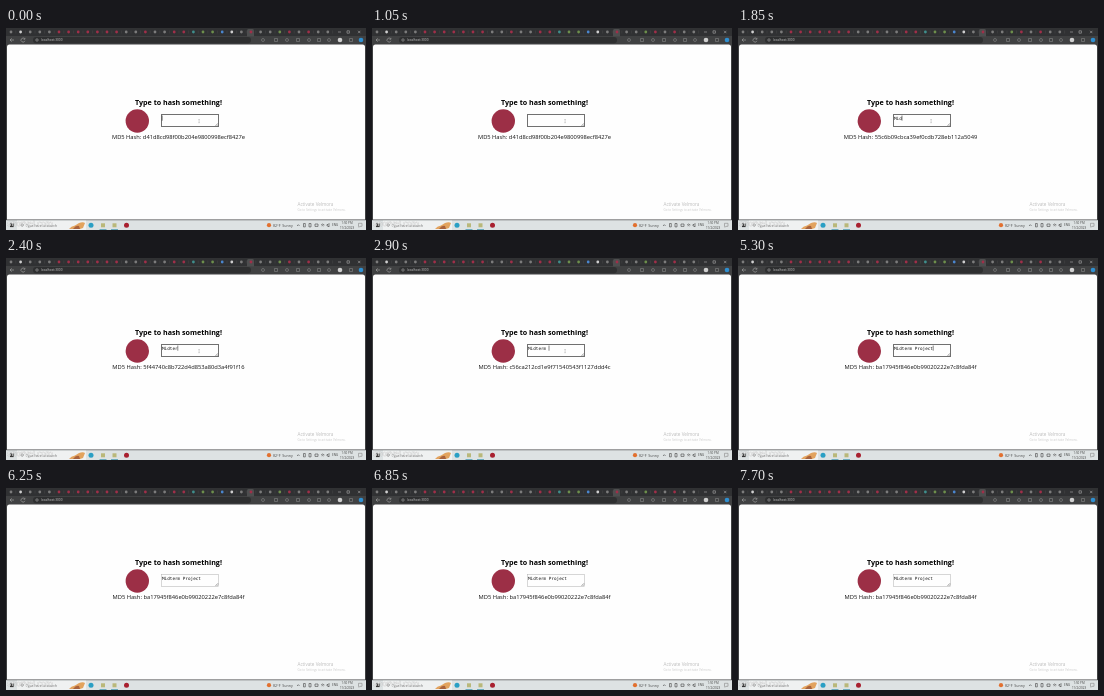
Animation of 360x202 px, one loop 7750 ms. Source, as an HTML page:

```html
<!DOCTYPE html>
<html lang="en">
<head>
<meta charset="utf-8">
<title>Type to hash something</title>
<style>
  html, body { margin: 0; width: 100%; height: 100%; overflow: hidden; background: #fff; }
  svg { display: block; width: 360px; height: 202px; }
  text { font-family: "Open Sans", "Noto Sans", sans-serif; white-space: pre; }
  .mono { font-family: "DejaVu Sans Mono", monospace; }
</style>
</head>
<body>
<svg viewBox="0 0 360 202">
  <rect width="360" height="202" fill="#404142"/>
  <rect width="360" height="8" fill="#303133"/>
  <path d="M241 8.500V2.500q0-1.500 1.500-1.500h4q1.500 0 1.500 1.500v6z" fill="#4d4e4f"/>
  <g id="tabs"></g>
  <g id="tools" fill="none" stroke="#858687" stroke-width=".6"></g>
  <rect x="27" y="9" width="218" height="6.200" rx="3" fill="#2e2f30"/>
  <g fill="none" stroke="#a8a8a8" stroke-width=".6">
    <path d="M8 12H4l1.700-1.700M4 12l1.700 1.700M18.700 11a2 2 0 1 0 .2 1.800M18.900 9.800v1.400h-1.400"/>
    <circle cx="31" cy="12" r="1.200"/>
    <path d="M332 4h3M341 2.800h2.400v2.400H341zM352 2.800l2.400 2.400m0-2.400L352 5.200"/>
  </g>
  <text x="35" y="13.300" font-size="3.200" fill="#c8c8c8">localhost:3000</text>
  <circle cx="334" cy="12" r="2.300" fill="#cfcfcf"/>
  <circle cx="355" cy="12" r="2.300" fill="#2f8fd0"/>

  <path d="M1 191.400V19q0-2.500 2.500-2.500h353q2.500 0 2.500 2.500v172.400z" fill="#fefefe"/>
  <text x="172.500" y="77" font-size="7.130" font-weight="700" text-anchor="middle">Type to hash something!</text>
  <circle cx="131.300" cy="93" r="11.700" fill="#9c2f46"/>
  <rect id="box" x="155.500" y="86.500" width="57" height="12" fill="#fefefe"/>
  <path d="M209.500 97.800l2.500-2.500m-1.100 2.500l1.100-1.100" stroke="#666" stroke-width=".6"/>
  <text id="typed" class="mono" x="156" y="91.600" font-size="4.320" fill="#111"></text>
  <path id="caret" d="M0 87.500v5.200" stroke="#333" stroke-width=".6"/>
  <path id="pointer" d="M192.300 91.500h1.600m-.8 0v3.200m-.8 0h1.600" fill="none" stroke="#999" stroke-width=".4"/>
  <text id="hash" x="172.500" y="110.600" font-size="5.750" text-anchor="middle" fill="#111"></text>
  <text x="291.500" y="178" font-size="4.600" fill="#bcbcbc">Activate Velmora</text>
  <text x="291.500" y="183" font-size="3" fill="#cacaca">Go to Settings to activate Velmora.</text>

  <rect y="192.200" width="360" height="9.800" fill="#dde2e3"/>
  <rect x="11" y="192.700" width="69" height="9.300" fill="#eff1f1"/>
  <rect x="4" y="195.500" width="3.600" height="3.600" fill="#333"/>
  <circle cx="16.200" cy="197" r="1.200" fill="none" stroke="#555" stroke-width=".5"/>
  <text x="20" y="198.600" font-size="3.400" fill="#666">Type here to search</text>
  <path d="M63 201q2-3 6-3.500l4-2.500q4-1.500 6 0l-2 5-3 1z" fill="#e2a35e"/>
  <path d="M67 201q3-4 6-3l1 3z" fill="#a8623c"/>
  <g id="apps"></g>
  <circle cx="263" cy="197.200" r="2.100" fill="#e2702f"/>
  <text x="267" y="198.600" font-size="3.600" fill="#444">82°F  Sunny</text>
  <g fill="none" stroke="#444" stroke-width=".6">
    <path d="M291 198l1.300-1.300 1.300 1.300M297.500 195.500h1.800v3.400h-1.800zM303 195.500h2v3.400h-2zM309 196h3v2.400h-3zM315 197l1.700-1 1.700 1m-2.600 1l.9-.5.9.5M321 196.500h1l1-1v3.500l-1-1h-1z"/>
    <path d="M352.500 195.300h3.500v3h-2l-1 1v-1h-.5z" stroke="#888"/>
  </g>
  <text x="326" y="198.400" font-size="3" fill="#444">ENG</text>
  <g font-size="3" fill="#444" text-anchor="middle">
    <text x="341" y="196.400">1:50 PM</text>
    <text x="341" y="200.500">11/2/2023</text>
  </g>
  <text x="1.500" y="197.500" font-size="8" fill="#fff" fill-opacity=".85" stroke="#777" stroke-width=".6" stroke-opacity=".4" paint-order="stroke">snorvel.com</text>
</svg>
<script>
const LOOP = 7750, BLUR = 6050, BLINK = 530, CHAR_WIDTH = 2.6;
const phrase = "Midterm Project";
const keyTimes = [1350, 1600, 1800, 2000, 2150, 2350, 2500, 2700, 3350, 3700, 3950, 4350, 4500, 4650, 4900];
const el = id => document.getElementById(id);
const shift = [[7, 12, 17, 22], [5, 9, 14, 20], [4, 11, 16, 23], [6, 10, 15, 21]];

// Single-block MD5, enough for short ASCII text
function md5(text) {
  const words = new Int32Array(16);
  [...text + "\x80"].forEach((ch, i) => words[i >> 2] |= ch.charCodeAt(0) << i % 4 * 8);
  words[14] = text.length * 8;
  const init = [0x67452301, 0xefcdab89, 0x98badcfe, 0x10325476];
  let [a, b, c, d] = init;
  for (let i = 0; i < 64; i++) {
    const round = i >> 4;
    const mix = [b & c | ~b & d, d & b | ~d & c, b ^ c ^ d, c ^ (b | ~d)][round];
    const word = words[[i, 5 * i + 1, 3 * i + 5, 7 * i][round] % 16];
    const sum = a + mix + Math.floor(Math.abs(Math.sin(i + 1)) * 2 ** 32) + word | 0;
    const n = shift[round][i % 4];
    [a, b, c, d] = [d, b + (sum << n | sum >>> 32 - n) | 0, b, c];
  }
  return [a, b, c, d].map((v, i) => [0, 8, 16, 24].map(bits =>
    (v + init[i] >>> bits & 255).toString(16).padStart(2, "0")).join("")).join("");
}

const dot = (x, y, r, fill) => `<circle cx="${x}" cy="${y}" r="${r}" fill="${fill}"/>`;

// One letter per tab icon: red, white, grey, blue, green, teal
const tabColors = { r: "#a02f49", w: "#d0d0d0", g: "#7c7c7c", b: "#4a86cf", n: "#6d8f4c", t: "#3f8f8c" };
el("tabs").innerHTML = [..."gwgggrrrrrrrggrggrrtnnbwgrggnrgrgg"].map((key, i) =>
  dot(5 + i * 9.6, 4, 1.4, tabColors[key]) +
  `<path d="M${9.8 + i * 9.6} 2.500v3" stroke="#505050" stroke-width=".4"/>`).join("");
el("tools").innerHTML = [257, 270, 281, 292, 303, 313, 323, 345].map((x, i) =>
  i % 2 ? `<path d="M${x - 1.5} 10.500h3v3h-3z"/>` : `<circle cx="${x}" cy="12" r="1.500"/>`).join("");
el("apps").innerHTML = dot(85, 197.3, 2.5, "#2a9fc4") + dot(120.5, 197.3, 2.5, "#a8202f")
  + [97, 108.5].map(x => `<rect x="${x - 2}" y="195.300" width="4" height="4" fill="#b9b87a"/>
    <path d="M${x - 3.5} 201.500h7" stroke="#4f9fb5" stroke-width=".8"/>`).join("");

const hashes = Array.from({ length: phrase.length + 1 }, (_, n) => md5(phrase.slice(0, n)));

function draw(now) {
  const t = now % LOOP;
  const count = keyTimes.filter(key => key <= t).length;
  const focused = t < BLUR;
  const sinceKey = t - (keyTimes[count - 1] || 0);
  el("typed").textContent = phrase.slice(0, count);
  el("hash").textContent = "MD5 Hash: " + hashes[count];
  el("caret").setAttribute("transform", `translate(${156.2 + count * CHAR_WIDTH})`);
  el("caret").style.opacity = focused && sinceKey % (2 * BLINK) < BLINK ? 1 : 0;
  el("pointer").style.opacity = t < 4900 ? 1 : 0;
  el("box").setAttribute("stroke", focused ? "#707070" : "#b0b0b0");
  el("box").setAttribute("stroke-width", focused ? 1 : .5);
  requestAnimationFrame(draw);
}
requestAnimationFrame(draw);
</script>
</body>
</html>
```
